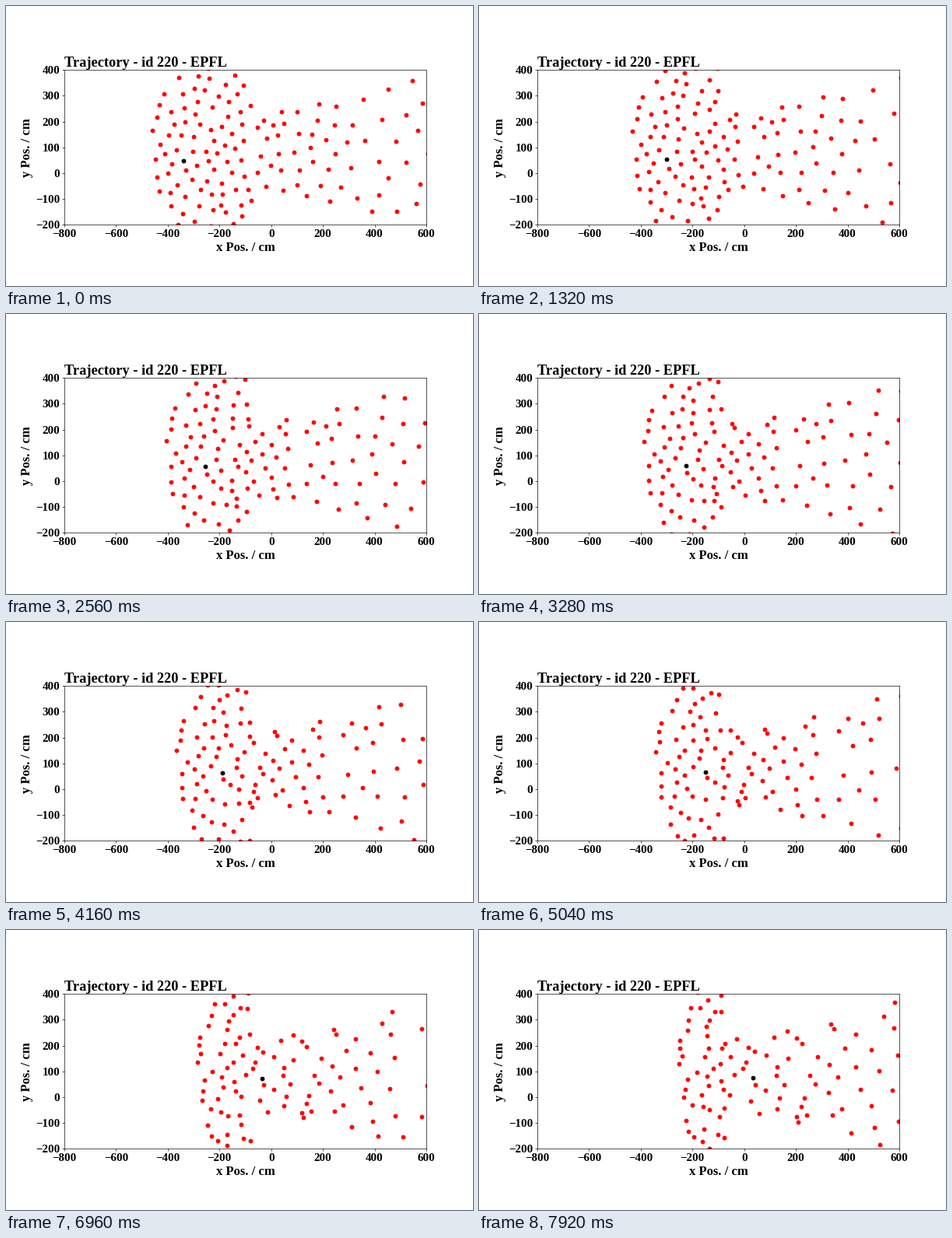
A matplotlib script for the animation above (8000 ms loop, 600 by 360 pixels).

```python
import numpy as np
import matplotlib.pyplot as plt
from matplotlib.animation import FuncAnimation

plt.rcParams.update({
    "font.family": "Liberation Serif",
    "font.weight": "bold",
    "axes.titleweight": "bold",
    "axes.labelweight": "bold",
})

TICK_MS, LOOP_MS, STEP_MS = 40, 8000, 62
LAST = 128

# All positions are in stage pixels, all speeds in pixels per step
GATE_X, GATE_Y, GATE_HALF = 320, 187, 50
FLOW, FAN = 62, .0035

# The tracked person
KEY_STEP = [0, 21, 30, 53, 67, 96, 128]
KEY_X = [228, 241, 248, 265.5, 277.5, 306, 351.5]

rng = np.random.default_rng(220)


def tracked_at(n):
    return np.interp(n, KEY_STEP, KEY_X), 198.5 - .07 * n


def pace(x):
    """Walking speed behind the gate."""
    return 1.35 + .0055 * np.maximum(x - GATE_X, 0)


def half_width(x):
    """Half the width of the stream behind the gate."""
    return GATE_HALF * np.exp(FAN * np.maximum(x - GATE_X - 25, 0))


def queue_spots(count):
    """Random places in the half disc of people waiting at the gate."""
    r = 134 * np.sqrt(rng.random(count))
    angle = np.radians(rng.uniform(-86, 86, count))
    return np.column_stack([GATE_X - r * np.cos(angle),
                            GATE_Y - 4 + 1.1 * r * np.sin(angle)])


def stream_spots(count):
    """Random places behind the gate, thinning out as people speed up."""
    grid = np.arange(GATE_X + 3, 545.0)
    clock = np.cumsum(1 / pace(grid))
    x = np.interp(rng.uniform(0, clock[-1], count), clock, grid)
    side = rng.uniform(-1, 1, count)
    return np.column_stack([x, GATE_Y + side * half_width(x)])


def scatter(placed, count, spots):
    """Add people one by one, each at the roomiest of some random spots."""
    for _ in range(count):
        tries = spots(60)
        gap = np.linalg.norm(tries[:, None] - placed, axis=2).min(axis=1)
        x = tries[:, 0]
        best = np.argmax(gap / np.sqrt(half_width(x) * pace(x)))
        placed = np.vstack([placed, tries[best]])
    return placed


def velocity(p):
    x, side = p[:, 0], p[:, 1] - GATE_Y
    # before the gate: flow through a slit, slower along the wall
    z = np.maximum(GATE_X - x, 0) + 1j * side
    w = np.arcsinh(z / GATE_HALF)
    slope = np.cosh(w)
    slow = .2 + .8 * np.cos(w.imag)
    flow = -FLOW / GATE_HALF * slow * slope / np.maximum(abs(slope), .3) ** 2
    before = np.column_stack([-flow.real, flow.imag])
    # behind the gate: walk on and fan out
    v = pace(x)
    spread = np.where(x > GATE_X + 25, FAN, 0) * side
    after = np.column_stack([v, v * spread])
    return np.where((x < GATE_X)[:, None], before, after)


people = scatter(np.array([tracked_at(0)]), 56, stream_spots)
people = scatter(people, 104, queue_spots)[1:]
crowd = [people]
for _ in range(LAST):
    crowd.append(crowd[-1] + velocity(crowd[-1]))

fig, ax = plt.subplots(figsize=(10, 6), dpi=60)
ax.set_aspect("equal")
ax.set_xlim(-800, 600)
ax.set_ylim(-200, 400)
ax.set_xticks(range(-800, 601, 200))
ax.set_yticks(range(-200, 401, 100))
ax.tick_params(labelsize=18)
ax.set_title("Trajectory - id 220 - EPFL", fontsize=22, loc="left", pad=5)
ax.set_xlabel("x Pos. / cm", fontsize=20, labelpad=3)
ax.set_ylabel("y Pos. / cm", fontsize=20, labelpad=3)
others, = ax.plot([], [], "o", color="red")
tracked, = ax.plot([], [], "o", color="black")

SCALE = 465 / 1400


def to_cm(x, y):
    return (x - 75) / SCALE - 800, 400 - (y - 82.1) / SCALE


def draw(i):
    n = min(((2 * i + 1) * TICK_MS // 2 - 1) // STEP_MS, LAST)
    others.set_data(*to_cm(*crowd[n].T))
    x, y = to_cm(*tracked_at(n))
    tracked.set_data([x], [y])
    return others, tracked


anim = FuncAnimation(fig, draw, frames=LOOP_MS // TICK_MS, interval=TICK_MS,
                     repeat=True, repeat_delay=0)
plt.show()
```
